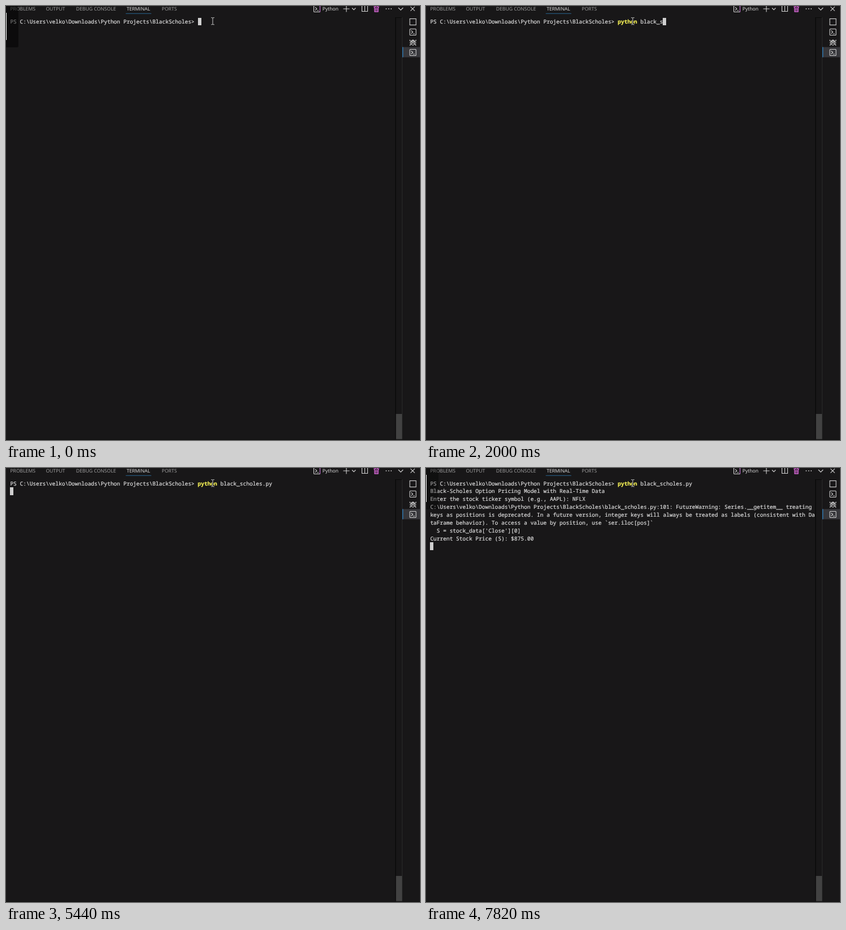
Animation of 731 by 766 pixels, one loop 8 s. Source, as an HTML page:

```html
<!DOCTYPE html>
<html lang="en">
<head>
<meta charset="utf-8">
<title>Terminal session</title>
<style>
html, body { margin: 0; width: 100%; height: 100%; overflow: hidden; background: #181718; }
svg, pre, #shade, #edge { position: absolute; left: 0; top: 0; }
svg { width: 731px; height: 766px; }
svg text { font: 8.6px "Open Sans", "Noto Sans", sans-serif; fill: #a6a6a6; text-rendering: geometricPrecision; }
svg .lit { fill: #e6e6e6; }
.icons { fill: none; stroke: #d2d2d2; stroke-width: 1.1; }
pre {
  left: 7.4px; top: 20.6px; margin: 0; color: #dcdcdc;
  font: 9.525px/13.86px "Noto Sans Mono", "DejaVu Sans Mono", monospace;
  -webkit-text-stroke: .22px; text-rendering: geometricPrecision; font-variant-ligatures: none;
}
#cmd { color: #f3ef55; font-weight: 600; }
#caret { display: inline-block; width: 6px; height: 13.86px; vertical-align: top; background: #cfcfcf; }
#beam { mix-blend-mode: difference; }
#shade {
  width: 22px; height: 73px; background: rgba(0, 0, 0, .5);
  border-radius: 0 0 3px 0; animation: shade 8s linear infinite;
}
#edge {
  top: 12px; width: 1px; height: 48px; background: #fff;
  animation: edge 8s step-end infinite;
}
@keyframes shade {
  0%, .87% { opacity: 1; }
  2.5%, 96.8% { opacity: 0; }
  97.7%, 100% { opacity: .6; }
}
@keyframes edge {
  0% { opacity: 1; }
  .87% { opacity: 0; }
  97.7%, 100% { opacity: 1; }
}
</style>
</head>
<body>
<svg viewBox="0 0 731 766">
  <defs>
    <g id="shell">
      <rect x="-5.5" y="-5.5" width="11" height="11" rx="1"/>
      <path d="M-3-2.8L-.2 0L-3 2.8M.3 3H3.3"/>
    </g>
  </defs>

  <!-- scrollbar and side list -->
  <rect x="687" y="20" width="1.6" height="746" fill="#0a0a0a"/>
  <rect x="687" y="20" width="12" height="1" fill="#0a0a0a"/>
  <rect x="699" y="20" width="1" height="746" fill="#2a2a2a"/>
  <rect x="688.6" y="720" width="10.6" height="46" fill="#424242"/>
  <rect y="764.5" width="731" height="1.5" fill="#111"/>
  <rect x="700" y="72.5" width="31" height="18" fill="#37373b"/>
  <rect x="700" y="72.5" width="1.2" height="18" fill="#2a80c4"/>

  <!-- panel tabs -->
  <text x="7.4" y="8.4">PROBLEMS</text>
  <text x="70.4" y="8.4">OUTPUT</text>
  <text x="123.8" y="8.4">DEBUG CONSOLE</text>
  <text x="213" y="8.4" class="lit">TERMINAL</text>
  <text x="275" y="8.4">PORTS</text>
  <text x="558.8" y="8.2" class="lit">Python</text>
  <rect x="211.5" y="12.8" width="45" height="1" fill="#28658f"/>

  <g class="icons">
    <use href="#shell" x="549" y="5"/>
    <path d="M554.5 0V10.5" stroke="#c067d0"/>
    <path d="M595.5 5H606.5M601-.5V10.5"/>
    <path d="M611 3.5L614.2 6.7L617.4 3.5"/>
    <path d="M628.5-1V9.5H638.5V-1M633.5-1V9.5"/>
    <g stroke="#e06be0">
      <path d="M649 1.5H659M652 1V-.5H656V1"/>
      <path d="M650.5 2L651 10H657L657.5 2M652.8 3V8.5M655.2 3V8.5" stroke-width="1.3"/>
    </g>
    <path d="M670.5 5H681" stroke-width="1.7" stroke-dasharray="1.7 2.7"/>
    <path d="M692.8 3L697 7.2L701.2 3"/>
    <path d="M714.3 1.3L721.7 8.7M721.7 1.3L714.3 8.7"/>

    <rect x="713" y="22.5" width="11" height="11"/>
    <use href="#shell" x="718.5" y="46"/>
    <use href="#shell" x="718.5" y="82"/>
    <g transform="translate(718.5 64)">
      <ellipse cy="1" rx="3.3" ry="4.2"/>
      <path d="M-2.6-2A2.7 2.7 0 0 1 2.6-2ZM-2-1L2 3M2-1L-2 3"/>
      <path d="M-3.2 1H-6M3.2 1H6M-3-1L-5.3-2.5V-4.5M3-1L5.3-2.5V-4.5M-3 3L-5 4.3V6M3 3L5 4.3V6"/>
    </g>
  </g>
</svg>

<pre><span id="prompt"></span><span id="cmd"></span><span id="rest"></span><span id="caret"></span></pre>

<svg id="beam" viewBox="0 0 731 766">
  <path d="M362.3 20.6H364.3L365 21.3L365.7 20.6H367.8M365 21V32.5M362.3 32.8H364.3L365 32.1L365.7 32.8H367.8"
    fill="none" stroke="#e4e4e4"/>
</svg>
<div id="shade"></div>
<div id="edge"></div>

<script>
const LOOP = 8000;
const home = "C:\\Users\\velko\\Downloads\\Python Projects\\BlackScholes";
const $ = id => document.getElementById(id);

const command = "python", args = " black_scholes.py", ticker = "NFLX";
const commandKeys = [190, 310, 380, 500, 570, 690];
const argKeys = [820, 940, 1060, 1190, 1440, 1750, 1750, 2000, 2130, 2190,
  2310, 2380, 2440, 2560, 2690, 2750, 3000];
const tickerKeys = [6630, 6750, 6940, 7130];

const intro = "Black-Scholes Option Pricing Model with Real-Time Data\n" +
  "Enter the stock ticker symbol (e.g., AAPL): ";
const result = home + "\\black_scholes.py:101: FutureWarning: Series.__getitem__ treating \n" +
  "keys as positions is deprecated. In a future version, integer keys will always be treated as labels (consistent with Da\n" +
  "taFrame behavior). To access a value by position, use `ser.iloc[pos]`\n" +
  "  S = stock_data['Close'][0]\n" +
  "Current Stock Price (S): $875.00\n";

const typed = (text, keys, t) => text.slice(0, keys.filter(k => k <= t).length);
const after = (time, text, t) => t >= time ? text : "";

function render(t) {
  $("cmd").textContent = typed(command, commandKeys, t);
  $("rest").textContent = typed(args, argKeys, t) +
    after(3250, "\n", t) +
    after(5820, intro, t) +
    typed(ticker, tickerKeys, t) +
    after(7380, "\n", t) +
    after(7560, result, t);
}

$("prompt").textContent = "PS " + home + "> ";
const motions = document.getAnimations();
let start;
function tick(now) {
  start ??= now;
  const t = (now - start) % LOOP;
  motions.forEach(m => m.currentTime = t);
  render(t);
  requestAnimationFrame(tick);
}
render(0);
requestAnimationFrame(tick);
</script>
</body>
</html>
```
